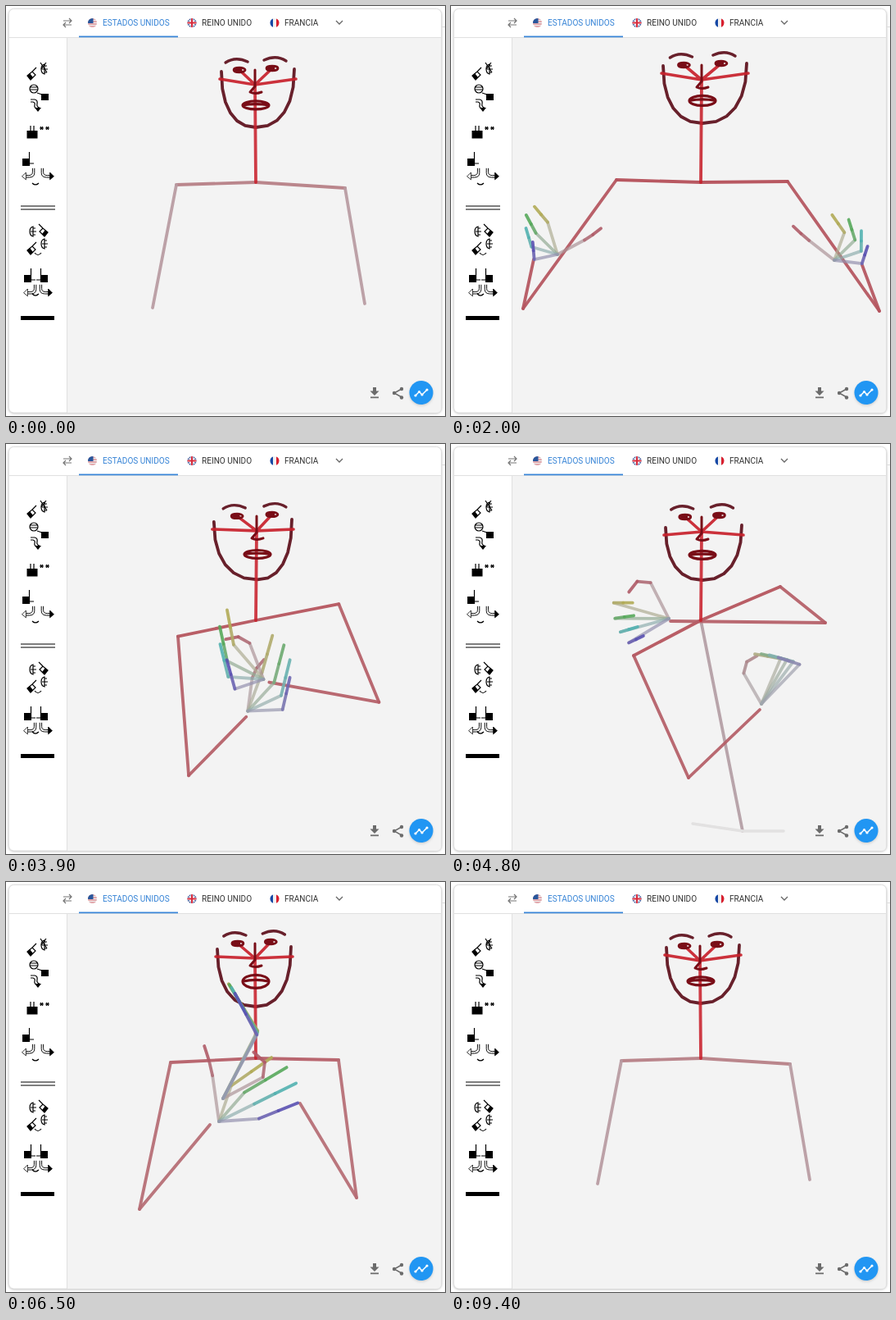
An HTML page for the animation above (9.5 s loop, 536 by 500 pixels).

```html
<!DOCTYPE html>
<html lang="es">
<head>
<meta charset="utf-8">
<title>Sign pose viewer</title>
<style>
  html, body { margin: 0; width: 100%; height: 100%; overflow: hidden; background: #fff; }
  svg { display: block; }
  text { font: 10.05px Roboto, Arial, sans-serif; fill: #333; }
  #figure { fill: none; stroke-linecap: round; stroke-linejoin: round; }
  .ink { fill: none; stroke: #000; stroke-width: 1.2; }
</style>
</head>
<body>
<svg width="536" height="500" viewBox="0 0 536 500">
  <defs>
    <clipPath id="disc"><circle r="5.5"/></clipPath>
    <filter id="soft" x="-10%" y="-10%" width="120%" height="120%"><feGaussianBlur stdDeviation="1.5"/></filter>
    <g id="hook">
      <path class="ink" d="M8 -9v6q0 5 -6 5h-4M11 -9v7q0 7 -8 7h-5"/>
      <path d="M-2 -2.5v11l-6 -5z" stroke="#000"/>
    </g>
    <g id="palm">
      <path class="ink" d="M-5 1L1 -4L5 0L-1 6zM1 -4L6 -9"/>
      <path d="M-5 1L-1 6L2 3L-2 -2z"/>
    </g>
    <path id="oval" class="ink" d="M0 -6Q-4 -5 -4 0T0 6zM0 -4h3M0 0h4M0 4h3M-3 0h3"/>
    <g id="fist"><path d="M0 0h9v9h-9z"/><path class="ink" d="M8.5 6V-8M8 6h6"/></g>
  </defs>

  <rect x="3" y="4" width="529" height="493" rx="7" fill="#bbb" filter="url(#soft)"/>
  <rect x="3.5" y="3.5" width="528" height="492.5" rx="6" fill="#fff" stroke="#e0e0e0"/>
  <path d="M532 25.5h4" stroke="#ddd"/>
  <path d="M75 39H531V490Q531 496 525 496H75z" fill="#f3f3f3"/>
  <path d="M4 38.5H531M74.5 39V496" stroke="#e0e0e0" fill="none"/>

  <path d="M70 18h10m-3 -3l3 3l-3 3M80 23h-10m3 -3l-3 3l3 3" fill="none" stroke="#757575" stroke-width="1.2"/>
  <path d="M89 36.6h121v1.6H89z" fill="#3a86d8"/>
  <text x="118" y="24.2" style="fill:#3583d6">ESTADOS UNIDOS</text>
  <text x="239" y="24.2">REINO UNIDO</text>
  <text x="340" y="24.2">FRANCIA</text>
  <path d="M403 18l4 4l4 -4" fill="none" stroke="#666" stroke-width="1.3"/>
  <g transform="translate(105.5 20.5)" clip-path="url(#disc)">
    <path d="M-6 -6h12v12h-12z" fill="#eee"/>
    <path d="M-6 -4.5h12M-6 -1.5h12M-6 1.5h12M-6 4.5h12" stroke="#d5636c" stroke-width="1.2"/>
    <path d="M-6 -6h7v6.5h-7z" fill="#29569b"/>
  </g>
  <g transform="translate(227 20.5)" clip-path="url(#disc)">
    <path d="M-6 -6h12v12h-12z" fill="#1d428f"/>
    <path d="M-6 -6L6 6M6 -6L-6 6" stroke="#eee" stroke-width="1.3"/>
    <path d="M0 -6V6M-6 0H6" stroke="#fff" stroke-width="3.6"/>
    <path d="M0 -6V6M-6 0H6" stroke="#d52b3c" stroke-width="2"/>
  </g>
  <g transform="translate(328 20.5)" clip-path="url(#disc)">
    <path d="M-6 -6h12v12h-12z" fill="#f2f2f2"/>
    <path d="M-6 -6h4v12h-4z" fill="#1648a5"/>
    <path d="M2 -6h4v12h-4z" fill="#d8202f"/>
  </g>

  <use href="#palm" x="31" y="84"/>
  <use href="#oval" x="47" y="77"/>
  <path class="ink" d="M42 69l8 12M49 69l-6 8" stroke-width="2"/>
  <ellipse class="ink" cx="34" cy="101" rx="5" ry="5"/>
  <path class="ink" d="M29 99h10M29 102h10M38 106l6 2"/>
  <path d="M43 107h9v8h-9z"/>
  <path class="ink" d="M30 114h5q4 1 3 5t3 5M30 117h3q3 1 2 4t3 4"/>
  <path d="M35 124h8l-4 5z"/>
  <path d="M25.5 152h13v9.5h-13z"/>
  <path class="ink" d="M30 146v7M34 146v7"/>
  <path class="ink" d="M41 149h5M42 147l3 4M45 147l-3 4M48 149h5M49 147l3 4M52 147l-3 4"/>
  <use href="#fist" x="20" y="186"/>
  <path class="ink" d="M32 216q4 4 8 0M18 244h42M18 248h42"/>
  <use href="#oval" x="33" y="275"/>
  <use href="#palm" transform="translate(46 275) scale(-1 1)"/>
  <use href="#palm" x="31" y="297"/>
  <use href="#oval" x="47" y="290"/>
  <path class="ink" d="M35 301q4 5 8 0"/>
  <use href="#fist" x="22" y="328"/>
  <use href="#fist" transform="translate(51 328) scale(-1 1)"/>
  <path class="ink" d="M32 351q4 4 8 0"/>
  <path d="M18 378h41v5H18z"/>
  <g fill="#fff">
    <use href="#hook" transform="translate(26 205) scale(.8)"/>
    <use href="#hook" transform="translate(28 347) scale(.8)"/>
  </g>
  <use href="#hook" transform="translate(52 205) scale(-.8 .8)"/>
  <use href="#hook" transform="translate(50 347) scale(-.8 .8)"/>

  <g id="figure"></g>

  <g fill="#6b6b6b">
    <path d="M445 476.5h10v1.8h-10zM448 465h4v4.5h3.5l-5.5 5.5l-5.5 -5.5h3.5z"/>
    <path d="M483 467l-9 5l9 5" fill="none" stroke="#6b6b6b" stroke-width="1.5"/>
    <circle cx="483" cy="467" r="2.2"/><circle cx="474" cy="472" r="2.2"/><circle cx="483" cy="477.5" r="2.2"/>
  </g>
  <circle cx="507" cy="473" r="14.5" fill="#aaa" opacity=".5" filter="url(#soft)"/>
  <circle cx="507" cy="471.5" r="14.5" fill="#2196f3"/>
  <path d="M500 475l4.5 -4.5l3.5 3.5l6 -6" fill="none" stroke="#fff" stroke-width="1.5"/>
  <g fill="#fff"><circle cx="500" cy="475" r="1.6"/><circle cx="504.5" cy="470.5" r="1.6"/><circle cx="508" cy="474" r="1.6"/><circle cx="514" cy="468" r="1.6"/></g>
</svg>

<script>
const LOOP = 9500, STEP = 100;
const NECK = [305, 215];
const GRAY = [172, 174, 174], PALE = [184, 164, 170], RED = [180, 70, 80];
const THUMB = [176, 76, 90];
const FINGERS = [
  { color: [178, 170, 70], reach: 1 },
  { color: [72, 168, 76], reach: 1 },
  { color: [66, 178, 176], reach: .95 },
  { color: [76, 64, 178], reach: .85 }
];

function lerp(a, b, k) {
  if (typeof a === 'number') return a + (b - a) * k;
  if (Array.isArray(a)) return a.map((v, i) => lerp(v, b[i], k));
  return Object.fromEntries(Object.keys(a).map(key => [key, lerp(a[key], b[key], k)]));
}
const clamp = v => Math.max(0, Math.min(1, v));
const rgb = c => `rgb(${c.map(Math.round)})`;
const move = ([x, y], degrees, length) => {
  const a = degrees * Math.PI / 180;
  return [x + length * Math.cos(a), y + length * Math.sin(a)];
};

// left and right are how far the face reaches from the nose, lift raises the ears
const face = (nose, left, right, lift, drop, lips = 5) => ({ nose, left, right, lift, drop, lips });
const arm = (shoulder, elbow, wrist, warmth) => ({ shoulder, elbow, wrist, warmth });
// pairs run from index to little finger; thumb is direction, length and bend
const hand = (at, palm, fan, aim, finger, thumb, vivid = .85) => ({ at, palm, fan, aim, finger, thumb, vivid });
const pose = (head, arms, hands, show = 1, torso = 0) => ({ head, arms, hands, show, torso });

const open = pose(
  face([306, 90], 49, 57, 8, 53, 6),
  [arm([202, 212], [88, 369], [101, 309], .85), arm([411, 214], [523, 372], [502, 316], .85)],
  [hand([130, 303], [41, 29], [-107, -192], [-130, -95], 25, [-28, 62, -10]),
   hand([468, 310], [36, 34], [-70, 7], [-125, -72], 26, [-142, 65, 5])]);

const crossed = pose(
  face([306, 105], 61, 40, 7, 60),
  [arm([199, 215], [167, 402], [223, 340], .75), arm([410, 213], [454, 396], [366, 353], .75)],
  [hand([225, 333], [41, 22], [-72, 34], [6, -6], 60, [-51, 64, -14]),
   hand([355, 349], [44, 20], [-103, -188], [-185, -173], 60, [-106, 76, -50])]);

const turned = pose(
  face([306, 107], 46, 51, -4, 59),
  [arm([223, 258], [290, 407], [377, 324], .75), arm([402, 174], [457, 218], [268, 216], .75)],
  [hand([379, 317], [60, 67], [-67, -46], [-170, -162], 32, [-120, 72, 90], .4),
   hand([266, 213], [70, 57], [-164, -211], [0, -25], 23, [-117, 82, -115])], 1, 1);

const raised = pose(
  face([304, 93], 48, 46, 2, 59, 8),
  [arm([201, 220], [163, 399], [249, 296], .6), arm([406, 217], [428, 385], [359, 270], .6)],
  [hand([260, 292], [46, 49], [-71, -4], [-35, -22], 60, [-98, 94, -10]),
   hand([265, 264], [93, 88], [-63, -62], [-122, -118], 67, [-28, 92, -110])]);

const lowered = pose(
  face([310, 89], 50, 42, 6, 63),
  [arm([206, 219], [149, 396], [178, 306], .75), arm([409, 215], [450, 377], [445, 320], .3)],
  [hand([182, 307], [53, 4], [-112, -135], [-18, -34], 66, [-112, 85, 95]),
   hand([373, 328], [89, 86], [-82, -65], [-200, -240], 24, [-80, 110, -55], .25)]);

const rest = hands => pose(
  face([304, 96], 43, 50, 7, 52),
  [arm([208, 218], [179, 368], [179, 368], .1), arm([414, 222], [438, 363], [438, 363], .1)],
  hands.map(h => ({ ...h, at: [h.at[0], h.at[1] + 60] })), 0);

const rise = lerp(open, crossed, .7);
const start = rest(rise.hands), end = rest(lowered.hands);
const keys = [
  [0, start], [200, start], [1100, rise], [2000, open], [3100, crossed], [4800, turned],
  [6500, raised], [7700, lowered], [8900, end], [LOOP, end]
];

function poseAt(time) {
  const next = keys.findIndex(([t]) => t > time);
  const [t0, a] = keys[next - 1], [t1, b] = keys[next];
  const k = (time - t0) / (t1 - t0);
  return lerp(a, b, k * k * (3 - 2 * k));
}

const stroke = (d, color, width = 3.8, opacity = 1) =>
  `<path d="${d}" stroke="${color}" stroke-width="${width}" opacity="${opacity}"/>`;
const line = (a, b, color, opacity) => stroke(`M${a}L${b}`, color, 3.8, opacity);

function jaw(l, r, chin) {
  const steps = 12, power = 2 / 2.3;
  return 'M' + Array.from({ length: steps + 1 }, (_, i) => {
    const side = i < steps / 2 ? l : r, a = i / steps * Math.PI;
    const across = Math.abs(Math.cos(a)) ** power, down = Math.sin(a) ** power;
    return [lerp(chin[0], side[0], across), lerp(side[1], chin[1], down)];
  }).join('L');
}

function drawFace({ nose, left, right, lift, drop, lips }) {
  const dark = '#68202b', deep = '#790d17', red = '#c8212c';
  const [x, y] = nose;
  const earL = [x - left, y - lift], earR = [x + right, y - lift];
  const eyeL = [x - left * .44, y - 18], eyeR = [x + right * .42, y - 20];
  const oval = (cx, cy, rx, ry) => `M${cx - rx} ${cy}a${rx} ${ry} 0 0 1 ${2 * rx} 0a${rx} ${ry} 0 0 1 ${-2 * rx} 0`;
  const eye = ([ex, ey]) => stroke(oval(ex, ey, 7, 2.8) + `m3 0h6`, deep, 2.8);
  const brow = ([ex, ey], side) =>
    stroke(`M${ex + side * 17} ${ey - 9}q${-side * 12} -8 ${-side * 27} -1`, dark, 3.4);
  const lipY = y + drop * .48;
  return stroke(jaw([earL[0] + 2, earL[1] - 9], [earR[0] - 2, earR[1] - 12], [x + 1, y + drop]), dark) +
    stroke(`M${earL}L${nose}L${earR}M${eyeL}L${nose}L${eyeR}`, red, 3.6, .92) +
    line(nose, NECK, red, .88) +
    brow(eyeL, -1) + brow(eyeR, 1) + eye(eyeL) + eye(eyeR) +
    stroke(`M${x} ${y - 18}V${y + 2}L${x - 6} ${y + 9}q6 3 14 0`, deep, 3) +
    stroke(oval(x + 1, lipY, 16, lips) + `q16 ${-lips * .5} 32 0`, deep, 3.2);
}

function drawArm({ shoulder, elbow, wrist, warmth }, show) {
  const shade = k => rgb(lerp(PALE, RED, clamp(k)));
  return line(NECK, shoulder, shade(warmth * .7 + .35), .92) +
    line(shoulder, elbow, shade(warmth), .92) +
    line(elbow, wrist, shade(warmth), .92 * show);
}

function drawHand({ at, palm, fan, aim, finger, thumb, vivid }, show) {
  const chain = (joints, color) => joints.slice(1).map((joint, i) =>
    line(joints[i], joint, rgb(lerp(GRAY, color, vivid * [.3, .8, 1][i])), i ? .9 : .7)).join('');
  const [direction, length, bend] = thumb;
  const base = move(at, direction, length * .6);
  const bent = move(base, direction + bend / 2, length * .2);
  const parts = [chain([at, base, bent, move(bent, direction + bend, length * .2)], THUMB)];
  FINGERS.forEach(({ color, reach }, i) => {
    const between = pair => lerp(pair[0], pair[1], i / 3);
    const knuckle = move(at, between(fan), between(palm));
    const tip = move(knuckle, between(aim), finger * reach);
    parts.push(chain([at, knuckle, lerp(knuckle, tip, .5), tip], color));
  });
  return `<g opacity="${show}">${parts.join('')}</g>`;
}

function drawTorso(amount) {
  const alpha = clamp(amount * 2.5 - 1.5), hip = [356, 472];
  return line(NECK, hip, rgb(PALE), alpha) +
    stroke(`M295 463L${hip}L406 472`, '#e2e1e1', 3.5, alpha);
}

const figure = document.getElementById('figure');
let shown = -1;

function frame(now) {
  const time = Math.floor(now % LOOP / STEP) * STEP;
  if (time !== shown) {
    shown = time;
    const { head, arms, hands, show, torso } = poseAt(time);
    const alpha = clamp(show * 2);
    figure.innerHTML = drawTorso(torso) +
      arms.map(a => drawArm(a, alpha)).join('') +
      drawFace(head) +
      hands.map(h => drawHand(h, alpha)).join('');
  }
  requestAnimationFrame(frame);
}
requestAnimationFrame(frame);
</script>
</body>
</html>
```
